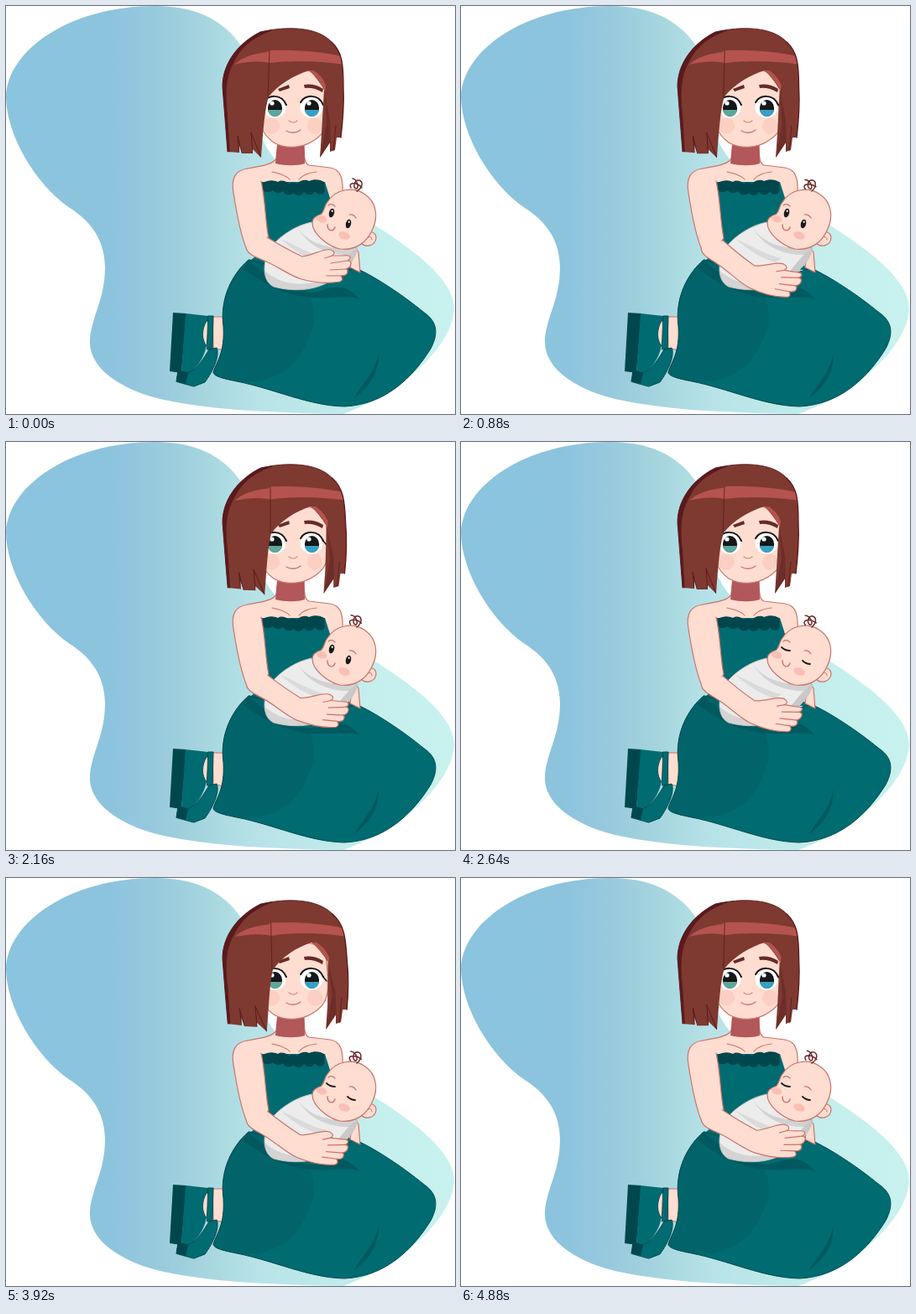
Write an HTML page with a canvas that moves like this. It is 535 px wide and 487 px high and loops after 4.96 s.

```html
<!DOCTYPE html>
<html lang="en">
<head>
<meta charset="utf-8">
<title>Mother and baby</title>
<style>
html, body { margin: 0; width: 100%; height: 100%; overflow: hidden; background: #fff; }
canvas { display: block; }
</style>
</head>
<body>
<canvas id="stage" width="535" height="487"></canvas>
<script>
const ctx = document.getElementById('stage').getContext('2d');
const LOOP = 4960, STEP = 80, PAT = 1680, SWAY = 2520;
const SKIN = '#ffddd0', LINE = '#c9736a', BLUSH = '#f9bfb4';
const HAIR = '#7e3930', HAIR_DARK = '#5a1a1e', SHINE = '#b5534e';
const TEAL = '#006b71', TEAL_MID = '#00646a', TEAL_DARK = '#00474d';

const clamp = v => Math.max(0, Math.min(1, v));
const ease = v => (1 - Math.cos(Math.PI * clamp(v))) / 2;

function shape(d, fill, stroke, width = 1.2) {
  const path = new Path2D(d);
  if (fill) { ctx.fillStyle = fill; ctx.fill(path); }
  if (stroke) { ctx.strokeStyle = stroke; ctx.lineWidth = width; ctx.stroke(path); }
}

function oval(x, y, rx, ry, fill, turn = 0) {
  ctx.beginPath();
  ctx.ellipse(x, y, rx, ry, turn, 0, 7);
  ctx.fillStyle = fill;
  ctx.fill();
}

function rotated(x, y, degrees, draw) {
  ctx.save();
  ctx.translate(x, y);
  ctx.rotate(degrees * Math.PI / 180);
  ctx.translate(-x, -y);
  draw();
  ctx.restore();
}

function clipped(d, draw) {
  ctx.save();
  ctx.clip(new Path2D(d));
  draw();
  ctx.restore();
}

const backdrop = ctx.createLinearGradient(0, 0, 535, 0);
[[0, '#8bc4de'], [.23, '#8cc4de'], [.3, '#95c7de'], [.4, '#9fd0dc'],
 [.47, '#abd9e1'], [.56, '#b7e3e8'], [.82, '#c4efed'], [1, '#c8f2ee']]
  .forEach(([at, color]) => backdrop.addColorStop(at, color));

function drawBackdrop() {
  shape('M178 0C220 0 258 13 281 49C297 85 292 125 306 160C330 212 390 232 440 262' +
    'C482 289 535 326 534 362C532 405 475 460 402 487' +
    'C315 486 215 481 163 463C120 447 98 424 100 397C103 368 118 350 118 311' +
    'C117 276 99 256 76 241C35 213 0 153 0 108C2 53 75 0 178 0Z', backdrop);
}

function drawFeet() {
  shape('M246 371L262 371L264 411L247 409Z', SKIN, LINE);
  shape('M199 366L215 367L209 438L195 436Z', TEAL_DARK);
  shape('M214 367L241 370L239 405C236 420 228 432 217 438L209 437Z', TEAL);
  shape('M239 376C233 386 233 398 239 406L242 377Z', SKIN, TEAL_DARK, .8);
  shape('M203 448L205 435L217 438C229 432 236 420 242 410L251 408C255 416 248 434 237 449L224 454Z',
    TEAL, TEAL_DARK, 1);
  shape('M205 435L217 438L214 451L203 448Z', TEAL_DARK);
  shape('M241 370L247 370L246 409L240 410Z', TEAL, TEAL_DARK, 1);
}

function drawTorso() {
  shape('M324 160L322 182C320 188 306 191 288 194L296 228L390 238L401 224' +
    'C402 206 399 195 386 193L361 190C356 188 355 183 355 160Z', SKIN, LINE);
  shape('M324 160L321 188C333 191 347 191 356 188L355 160Z', '#b2575a');
  shape('M317 198C327 200 334 202 338 207M349 207C353 202 360 199 370 198', null, LINE);
  shape('M304 210L380 210L391 245L362 285L420 316L288 306C301 297 309 288 310 276Z', TEAL);
  shape('M306 211C313 207 320 208 324 210C328 207 334 209 337 212Q342 209 347 212' +
    'C351 207 358 207 361 209C367 206 375 207 379 210L380 221' +
    'c-3 5 -9 5 -12 0c-2 5 -9 6 -13 1c-3 5 -9 5 -12 1c-4 4 -10 3 -13 -2c-4 3 -9 3 -12 -1c-4 3 -9 3 -12 0Z',
    TEAL_DARK);
}

const SKIRT = 'M289 303C267 322 255 352 259 382C261 414 251 424 247 437C247 442 260 445 275 448' +
  'C320 457 360 477 403 478C452 476 485 443 506 409C517 388 512 375 497 365' +
  'C473 345 438 322 417 313L375 326Z';

function drawSkirt() {
  shape(SKIRT, TEAL);
  clipped(SKIRT, () => {
    shape('M282 300L338 312C366 340 373 372 362 392C350 428 330 441 300 448L240 450L250 300Z', TEAL_MID);
    shape('M289 303C313 326 350 346 369 341C390 336 405 329 421 350' +
      'C411 345 392 349 365 348C332 347 300 327 282 313Z', '#00595f');
    shape('M444 414C444 438 434 454 415 468C424 451 439 440 444 414Z', '#00595f');
  });
  shape(SKIRT, null, TEAL_DARK, 1);
}

function drawUpperArm() {
  shape('M288 194C273 196 268 206 271 223C275 249 281 277 287 291L300 299' +
    'L313 277C309 258 309 230 304 209', SKIN, LINE);
}

const SWADDLE = 'M364 258C346 262 330 272 318 285C305 302 304 328 319 335' +
  'C344 342 371 339 388 327C402 317 415 306 419 289L391 289Z';

function drawSwaddle() {
  shape('M414 284L420 294L422 318L410 312Z', SKIN, LINE);
  shape(SWADDLE, '#ececec');
  clipped(SWADDLE, () => {
    shape('M347 264C358 282 383 291 416 290L414 297C382 299 359 285 347 264Z', '#d2d2d2');
    shape('M327 278C344 285 363 297 382 301L375 306C358 302 342 291 327 278Z', '#dadada');
    shape('M307 315C328 334 358 338 393 321L385 346L315 342Z', '#d4d4d4');
    shape('M419 287C402 302 393 316 381 330L394 328L419 302Z', '#c9c9c9');
  });
  shape(SWADDLE, null, '#c0c0c0', 1);
}

function drawBaby(pat, asleep) {
  shape('M428 272C433 267 441 270 441 277C440 286 429 289 423 283Z', SKIN, LINE);
  shape('M431 276Q436 274 436 279', null, LINE, 1);
  shape('M383 234C393 218 414 215 428 225C441 234 444 251 437 266C430 283 416 292 398 290' +
    'C384 287 365 272 365 259C365 251 372 251 376 248C380 243 379 239 383 234Z', SKIN, LINE);
  oval(376, 254, 6.5, 4.2, BLUSH, .35);
  oval(403, 274, 7, 4.5, BLUSH, .35);
  shape('M384 238Q388 235 392 239M409 249Q414 248 417 253', null, LINE);
  if (asleep) {
    shape('M382 245Q386 249 392 249M407 261Q411 265 416 265', null, '#21191a', 1.8);
  } else {
    [[388, 247], [408, 260]].forEach(([x, y]) => {
      oval(x, y, 3.1, 5.4, '#18191b', .25);
      oval(x + .7, y - 2.3, 1, 1.3, '#fff');
    });
  }
  shape('M383 261C383 269 390 270 392 264', null, LINE, 1.4);
  rotated(418, 221, -13 * pat, () => shape('M418 221C425 217 426 210 421 208' +
    'C415 207 413 216 417 218C421 218 419 207 413 206M411 217Q409 213 412 212Q419 211 424 217',
    null, '#6c2929', 1.5));
}

function drawForearm(pat) {
  rotated(289, 286, 10.6 * pat, () => {
    shape('M287 291C290 298 299 300 310 305C326 312 338 322 352 326C367 330 383 332 398 329' +
      'Q403 327 399 322Q407 322 407 317Q407 314 405 314Q411 312 411 307Q411 304 407 304' +
      'Q411 302 410 299Q408 297 401 298L389 298Q394 294 387 291C378 289 368 297 353 299' +
      'C338 292 324 284 311 276', SKIN, LINE);
    shape('M389 298L380 301M407 304L387 307M405 314L386 315M399 322L382 322', null, LINE);
  });
}

function drawEye(x, iris) {
  oval(x, 121, 13.5, 12.5, '#fff');
  oval(x + .5, 122, 8.6, 10, '#151719');
  clipped(`M${x - 12} 124H${x + 14}V136H${x - 12}Z`, () => oval(x + .5, 124, 8.2, 8, iris));
  oval(x - 3, 116, 2.6, 2.6, '#fff');
  shape(`M${x - 13} 115C${x - 8} 106 ${x + 8} 104 ${x + 14} 118`, null, '#191416', 2);
}

function drawFace() {
  shape('M300 105C299 140 305 153 319 163C333 171 352 170 366 161C381 152 384 142 384 121' +
    'L380 82L344 74Z', SKIN, LINE);
  oval(316, 143, 10, 9.5, '#fbcfc2');
  oval(368, 143, 9, 9.5, '#fbcfc2');
  drawEye(320, '#5da79b');
  drawEye(364, '#38a0c3');
  shape('M378 118L382 123', null, '#191416', 1.5);
  shape('M324 99L337 94L338 98L326 102ZM355 94Q367 92 378 99L377 103Q367 97 356 98Z', '#672a29');
  shape('M337 137Q342 141 347 137', null, '#d98379', 1.2);
  shape('M334 149Q343 154 351 148', null, LINE, 1.3);
}

// Strands bend more towards the tips and towards the parted side.
function bend(d, sway) {
  return d.replace(/(\d+) (\d+)/g, (_, px, py) => {
    const x = +px, y = +py;
    const shift = sway * clamp((y - 25) / 120) * clamp((x - 262) / 44);
    return `${x + shift} ${y + (x < 322 ? shift * .35 : 0)}`;
  });
}

function drawHair(sway) {
  const lock = (d, fill, stroke, width) => shape(bend(d, sway), fill, stroke, width);
  const rightEdge = 'M388 43C401 55 402 70 402 98C403 118 401 140 399 157';
  const mass = 'M264 174L261 135L258 96C258 70 275 45 303 31C333 24 371 24 388 43' +
    'C401 55 402 70 402 98C403 118 401 140 399 157L394 157L392 172L386 174L386 163L374 181' +
    'L376 151L379 100C374 91 368 83 361 77C342 83 325 94 313 108C308 124 306 154 304 181' +
    'L294 171L294 176L281 176L278 166L278 175Z';
  lock(mass, HAIR);
  clipped(bend(mass, sway), () => {
    lock('M250 180L267 180L264 130C261 102 262 84 272 66C281 49 293 38 318 29L300 15L250 20Z', HAIR_DARK);
    lock('M272 70C280 62 293 57 311 55L314 53C340 52 375 54 400 60L404 70' +
      'C374 65 337 65 314 68C298 65 284 67 272 70Z', SHINE);
    lock('M359 77L367 77C374 82 379 88 381 95L380 102C375 91 369 83 361 77Z', SHINE);
    lock('M379 101L382 140L374 181L387 173L386 136Z', '#6d2d29');
    lock('M278 175L276 155L281 176M294 176L292 151L304 181', null, HAIR_DARK, 1);
    lock('M314 53L312 108M390 173L393 143', null, HAIR_DARK, .8);
  });
  lock(rightEdge, null, HAIR_DARK, 1.3);
  lock('M264 174L261 135L258 96C258 70 275 45 303 31C333 24 371 24 388 43', null, HAIR_DARK, .9);
}

function draw(time) {
  const t = Math.floor(time % LOOP / STEP) * STEP;
  const pat = 1 - Math.abs(1 - 2 * (t % PAT) / PAT);
  const s = t % SWAY;
  const sway = 8 * (ease((s - 660) / 940) - ease((s - 1850) / 670));
  ctx.clearRect(0, 0, 535, 487);
  ctx.lineCap = ctx.lineJoin = 'round';
  drawBackdrop();
  drawFeet();
  drawTorso();
  drawSkirt();
  drawUpperArm();
  drawSwaddle();
  drawBaby(pat, t >= SWAY);
  drawForearm(pat);
  drawFace();
  drawHair(sway);
}

let start;
function tick(now) {
  start ??= now;
  draw(now - start);
  requestAnimationFrame(tick);
}
draw(0);
requestAnimationFrame(tick);
</script>
</body>
</html>
```
